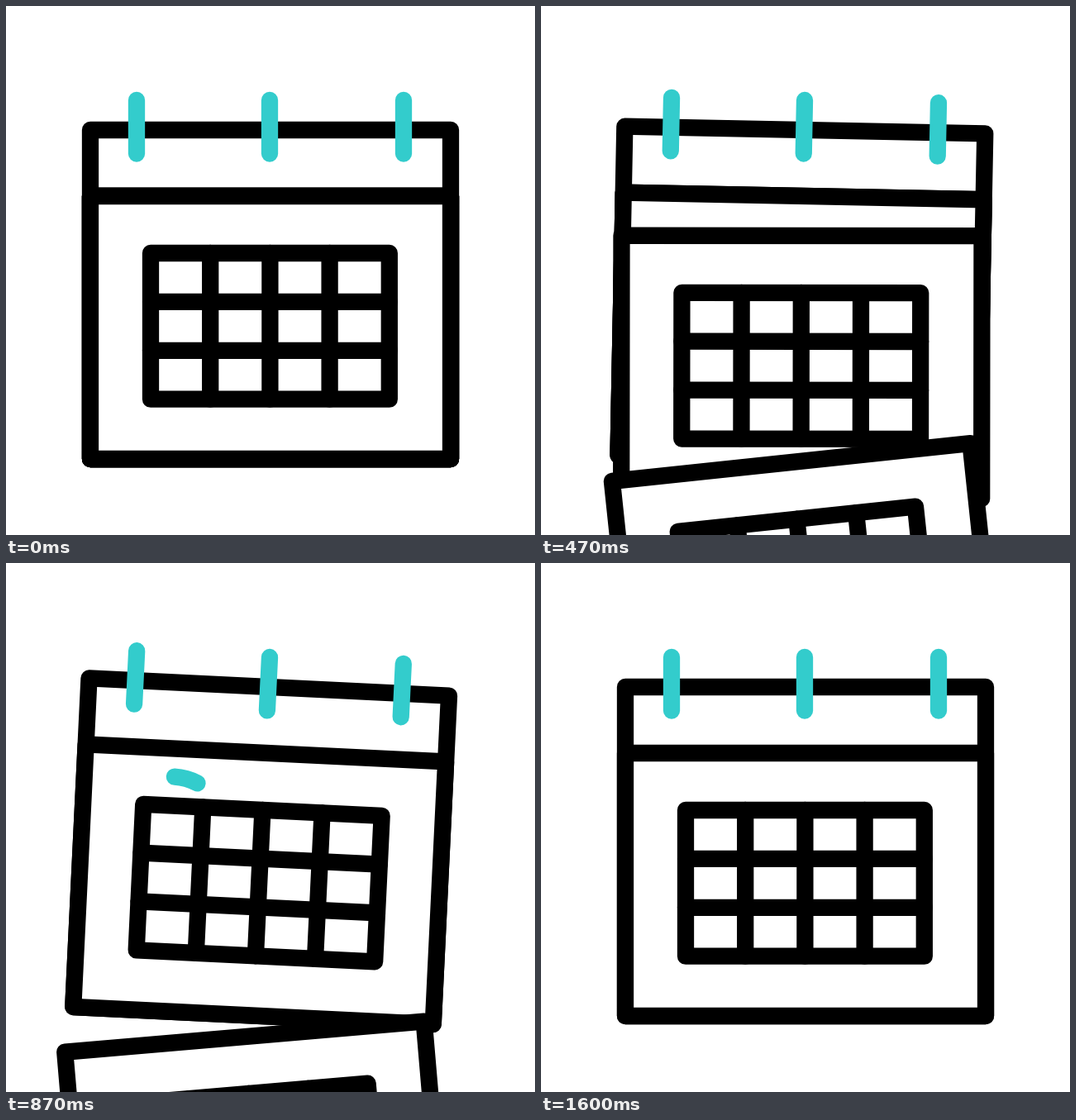
Animation, 640 px wide and 640 px high, one loop 1.67 s. Source, as an HTML page with a canvas:

```html
<!DOCTYPE html>
<html lang="en">
<head>
<meta charset="utf-8">
<title>Calendar</title>
<style>
  html, body { margin: 0; width: 100%; height: 100%; overflow: hidden; background: #fff; }
  canvas { display: block; width: 100vmin; height: 100vmin; }
</style>
</head>
<body>
<canvas id="stage" width="640" height="640"></canvas>
<script>
const ctx = document.getElementById("stage").getContext("2d");
const LOOP = 1670;
const STEP = 1000 / 30;
const TEAL = "#33cccc";
const PIVOT = { x: 319, y: 114 };
const RAD = Math.PI / 180;

// All times below are counted in steps of 1/30 s.
const SWING = [[2, 0], [9.1, 10], [19.05, -8.3], [28, 4], [33, 0]];
const FALL = { spans: [[4.15, 21.4], [9.9, 28.8], [15.2, 33.3]], distance: 510, drift: -0.027, turn: -0.0222 };
const RING = { x: 211, y: 328, radius: 64, head: [22.2, 42.2], tail: [28.2, 47.8] };

function ease(start, end, time) {
  const u = Math.min(1, Math.max(0, (time - start) / (end - start)));
  return u < 0.5 ? 2 * u * u : 1 - 2 * (1 - u) ** 2;
}

function swingAngle(time) {
  let angle = 0;
  for (let i = 1; i < SWING.length; i++) {
    const [t0, a0] = SWING[i - 1];
    const [t1, a1] = SWING[i];
    angle += (a1 - a0) * ease(t0, t1, time);
  }
  return angle * RAD;
}

function line(x1, y1, x2, y2) {
  ctx.beginPath();
  ctx.moveTo(x1, y1);
  ctx.lineTo(x2, y2);
  ctx.stroke();
}

function panel(x, y, w, h) {
  ctx.fillRect(x, y, w, h);
  ctx.strokeRect(x, y, w, h);
}

function drawSheet() {
  panel(102, 230, 436, 318);
  const left = 175, top = 299, cellW = 72.2, cellH = 58.9;
  const width = cellW * 4, height = cellH * 3;
  ctx.strokeRect(left, top, width, height);
  for (let i = 1; i < 4; i++) line(left + i * cellW, top, left + i * cellW, top + height);
  for (let i = 1; i < 3; i++) line(left, top + i * cellH, left + width, top + i * cellH);
}

function drawFallingSheet([start, end], time) {
  const drop = FALL.distance * ease(start, end, time);
  ctx.save();
  ctx.translate(320 + drop * FALL.drift, 230 + drop);
  ctx.rotate(drop * FALL.turn * RAD);
  ctx.translate(-320, -230);
  drawSheet();
  ctx.restore();
}

function drawRing(time) {
  const head = ease(...RING.head, time);
  const tail = ease(...RING.tail, time);
  if (head - tail < 1e-4) return;
  const angle = part => (part * 360 - 90) * RAD;
  ctx.beginPath();
  ctx.arc(RING.x, RING.y, RING.radius, angle(tail), angle(head));
  ctx.stroke();
}

function draw(time) {
  ctx.fillStyle = "#fff";
  ctx.fillRect(0, 0, 640, 640);
  ctx.save();
  ctx.translate(PIVOT.x, PIVOT.y);
  ctx.rotate(swingAngle(time));
  ctx.translate(-PIVOT.x, -PIVOT.y);

  ctx.lineWidth = 20.3;
  ctx.lineCap = ctx.lineJoin = "round";
  ctx.strokeStyle = "#000";
  panel(102, 150, 436, 398);
  drawSheet();
  // The first sheet to fall lies on top.
  for (const span of [...FALL.spans].reverse()) drawFallingSheet(span, time);

  ctx.strokeStyle = TEAL;
  for (const x of [158, 319, 481]) line(x, 114, x, 178.5);
  drawRing(time);
  ctx.restore();
}

function tick() {
  const ms = performance.now() % LOOP;
  draw(Math.floor((ms + 3.4) / STEP));
  requestAnimationFrame(tick);
}
tick();
</script>
</body>
</html>
```
